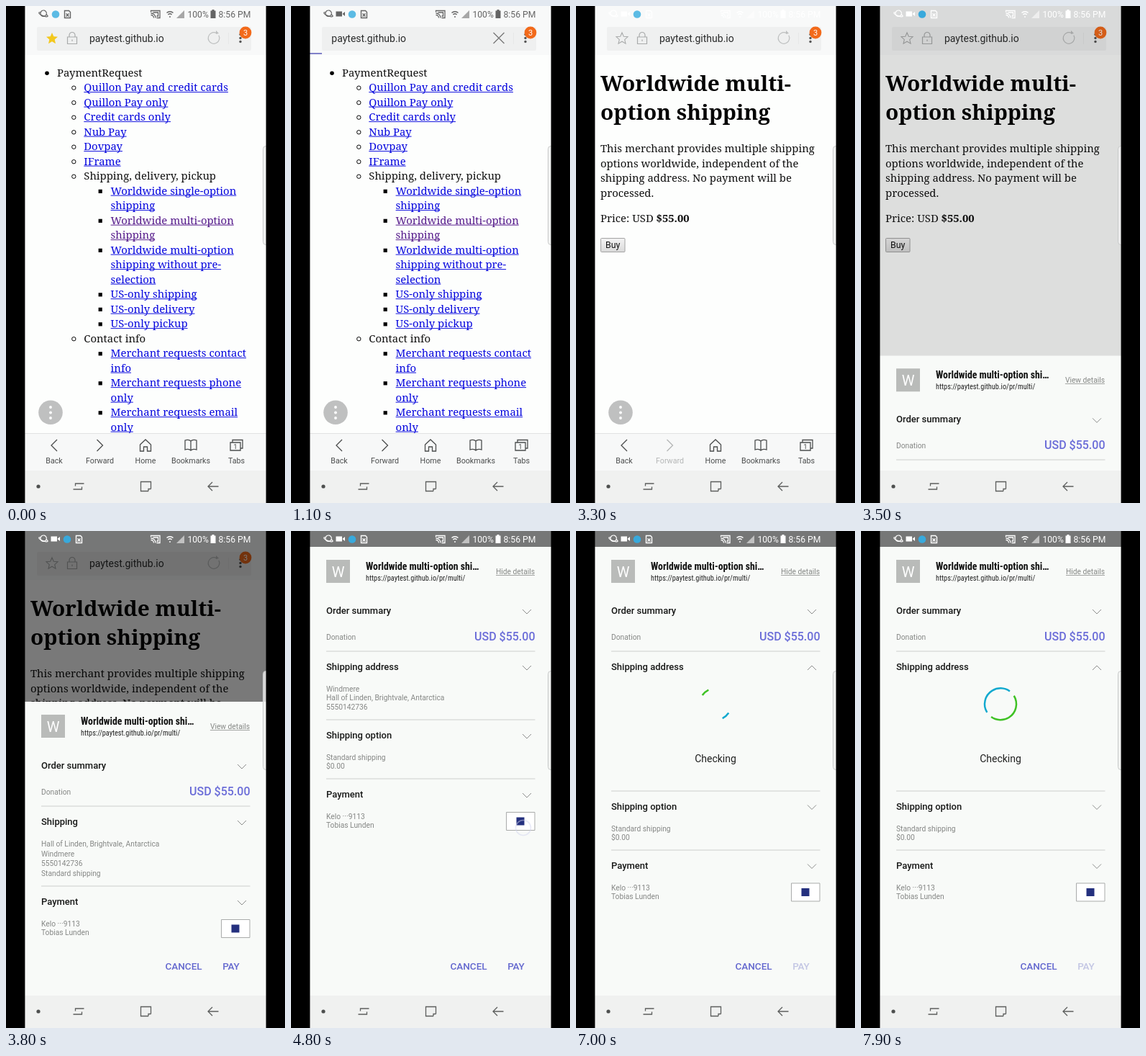
These frames come from a looping animation (388x690 px, 8000 ms). An HTML page with a canvas:

```html
<!DOCTYPE html>
<html lang="en">
<head>
<meta charset="utf-8">
<title>Payment request demo</title>
<style>
html, body { margin: 0; width: 100%; height: 100%; overflow: hidden; background: #000; }
canvas { display: block; width: 388px; height: 690px; }
</style>
</head>
<body>
<canvas id="stage"></canvas>
<script>
const W = 388, H = 690, LOOP = 8000, LEFT = 26, RIGHT = 362, BEZEL = 26.4;
const canvas = document.getElementById('stage');
const ctx = canvas.getContext('2d');
const ratio = window.devicePixelRatio || 1;
canvas.width = W * ratio;
canvas.height = H * ratio;

const sans = (size, weight = 400) => `${weight} ${size}px Roboto, sans-serif`;
const serif = (size, weight = 400) => `${weight} ${size}px "Noto Serif", serif`;
const SMALL = sans(10.25), BODY = serif(14.89);
const GREY = '#858785', INK = '#171817', ACCENT = '#6468cf';
const LINK = '#0606de', VISITED = '#551a8b';

const part = (t, a, b) => Math.min(1, Math.max(0, (t - a) / (b - a)));
const smooth = p => p * p * (3 - 2 * p);
const mix = (a, b, p) => a + (b - a) * p;

function box(x, y, w, h, color) {
  ctx.fillStyle = color;
  ctx.fillRect(x, y, w, h);
}

function round(x, y, w, h, r, fill, stroke) {
  ctx.beginPath();
  ctx.roundRect(x, y, w, h, r);
  if (fill) { ctx.fillStyle = fill; ctx.fill(); }
  if (stroke) { ctx.strokeStyle = stroke; ctx.lineWidth = 1; ctx.stroke(); }
}

function dot(x, y, r, color) {
  ctx.beginPath();
  ctx.arc(x, y, r, 0, 7);
  ctx.fillStyle = color;
  ctx.fill();
}

function arc(x, y, r, a, b, color, width = 1.2) {
  ctx.beginPath();
  ctx.arc(x, y, r, a, b);
  ctx.strokeStyle = color;
  ctx.lineWidth = width;
  ctx.stroke();
}

// Draws an SVG path around the point x, y.
function icon(d, x, y, color, width = 1.3, fill = false) {
  ctx.save();
  ctx.translate(x, y);
  const path = new Path2D(d);
  ctx.strokeStyle = ctx.fillStyle = color;
  ctx.lineWidth = width;
  if (fill) ctx.fill(path); else ctx.stroke(path);
  ctx.restore();
}

function put(str, x, y, font, color, align = 'left') {
  ctx.font = font;
  ctx.fillStyle = color;
  ctx.textAlign = align;
  ctx.fillText(str, x, y);
  return ctx.measureText(str).width;
}

function link(str, x, y, font, color) {
  const w = put(str, x, y, font, color);
  box(x, y + .95, w, .95, color);
}

// Narrow face where present, otherwise a smaller size of the normal one.
function narrow(str, x, y, max, size, weight, color) {
  const font = s => `${weight} ${s}px "Roboto Condensed", Roboto, sans-serif`;
  ctx.font = font(size);
  const w = ctx.measureText(str).width;
  put(str, x, y, font(w > max ? size * max / w : size), color);
}

function clip(x, y, w, h, paint) {
  ctx.save();
  ctx.beginPath();
  ctx.rect(x, y, w, h);
  ctx.clip();
  paint();
  ctx.restore();
}

function ring(t, x, y, from, to) {
  const a = part(t, from, from + 150) * (1 - part(t, to - 200, to));
  if (a <= 0) return;
  ctx.globalAlpha = a;
  arc(x, y, 10.5, 0, 7, '#d3d4ee', 1.6);
  ctx.globalAlpha = 1;
}

/* ---------- phone chrome ---------- */

function statusBar(color, circle, video) {
  icon('M-4 -1A4.2 4.2 0 1 1 4 1A4.2 4.2 0 0 1 -4 -1M-4 -2C-7 -3 -7 -1 -4 1C0 3.5 7 5 6 2.5L4 .5', 52, 11, color, 1.2);
  let x = 69;
  if (video) {
    icon('M-6 -3.5H2.5V3.5H-6ZM3 0L6.5 -3V3Z', 68.5, 11, color, 1, true);
    x = 85;
  }
  dot(x, 11.5, 5.3, circle);
  icon('M-4 -5H2L4 -3V5H-4ZM-2 -1L2 3M2 -1L-2 3', x + 16.5, 11.5, color, 1.4);
  icon('M-6 -3V-5H6.5V5H2M-6 1A4 4 0 0 1 -2 5M-6 -1.5A6.5 6.5 0 0 1 .5 5M-3 -2.5H4V2.5H2', 207.5, 11.5, color, 1.3);
  icon('M-4.5 -1.5A6.5 6.5 0 0 1 4.5 -1.5M-2.6 1A3.8 3.8 0 0 1 2.6 1M0 3V5', 228, 11, color, 1.4);
  ctx.globalAlpha = .55;
  icon('M-5 5.5L6 -5.5V5.5Z', 242, 11.5, color, 1, true);
  ctx.globalAlpha = 1;
  put('100%', 252.5, 16, sans(12.1), color);
  icon('M-3.5 -4.5H-1.5V-6H1.5V-4.5H3.5V6H-3.5Z', 288, 11, color, 1, true);
  put('8:56 PM', 295.5, 16, sans(12.2), color);
}

function urlBar(loading, starred) {
  round(43, 29, 298, 33, 2, '#eff0f0');
  if (loading) {
    put('paytest.github.io', 56.3, 50, sans(14), '#2a2b2b');
    icon('M-7.5 -7.5L7.5 7.5M7.5 -7.5L-7.5 7.5', 289, 44.5, '#777');
  } else {
    const star = 'M0 -8L2.3 -2.7L8 -2.2L3.7 1.6L5 7.2L0 4.2L-5 7.2L-3.7 1.6L-8 -2.2L-2.3 -2.7Z';
    icon(star, 64, 45, starred ? '#f3c81e' : '#a9abab', 1.1, starred);
    icon('M-6.5 -2H6.5V7.5H-6.5ZM-4 -2V-4.5A4 4 0 0 1 4 -4.5V-2M0 1.5V4', 92, 45, '#a9abab', 1.2);
    put('paytest.github.io', 116, 50, sans(14), '#2a2b2b');
    arc(289, 44.5, 7.8, -.5, 5.2, '#bcbebe');
    icon('M-1 -4L3 0L-1 1Z', 293, 38, '#bcbebe', 1, true);
  }
  box(309, 37, 1, 16, '#e6e7e7');
  for (const y of [39.5, 44.5, 49.5]) dot(326, y, 1.7, '#555');
  dot(333, 37, 8.4, '#f26a1b');
  put('3', 333, 41, sans(11), '#fff', 'center');
}

function toolbar(canForward) {
  box(LEFT, 593, RIGHT - LEFT, 52, '#f7f8f8');
  box(LEFT, 593, RIGHT - LEFT, 1, '#e1e2e2');
  const on = '#4b4d4d', off = '#b4b6b6';
  const items = [
    ['Back', 67, 'M4 -8L-4 0L4 8'],
    ['Forward', 130.5, 'M-4 -8L4 0L-4 8'],
    ['Home', 194, 'M-7.5 -1L0 -8L7.5 -1V8H2.5V2H-2.5V8H-7.5Z'],
    ['Bookmarks', 257, 'M0 -6C-2 -8 -6 -8 -8 -7V6C-6 5 -2 5 0 7C2 5 6 5 8 6V-7C6 -8 2 -8 0 -6V7'],
    ['Tabs', 320.5, 'M-8.5 -4H5.5V7H-8.5ZM-5.5 -4V-7.5H8.5V4H5.5']
  ];
  for (const [name, x, d] of items) {
    const color = name === 'Forward' && !canForward ? off : on;
    icon(d, x, 610, color);
    put(name, x, 635, sans(10.7), color, 'center');
  }
  put('1', 319, 615, sans(9.5), on, 'center');
}

function navBar() {
  box(LEFT, 645, RIGHT - LEFT, 45, '#f0f1f0');
  dot(45, 667, 2.6, '#4d4f4e');
  icon('M-4.5 -.5V-4H7.5M-7.5 4H4.5V.5', 101, 667, '#5d5f5e');
  icon('M3.5 6.5H-7V-6.5H7V3.5M7 3.5H3.5V6.5', 194.5, 667, '#5d5f5e');
  icon('M7.5 0H-6.5M-1 -6L-7 0L-1 6', 288, 667, '#5d5f5e');
}

function edgeHandle() {
  clip(350, 180, RIGHT - 350, 165, () => round(357.5, 194.5, 12, 137, 4, 'rgba(240,241,241,.8)', '#c9cbcb'));
}

function floatButton() {
  dot(62, 564.3, 16.8, '#bfc0c0');
  for (const y of [557, 564.5, 572]) dot(62, y, 1.9, '#fff');
}

/* ---------- web pages ---------- */

const rows = [
  [0, 'PaymentRequest'],
  [1, 'Quillon Pay and credit cards', LINK], [1, 'Quillon Pay only', LINK],
  [1, 'Credit cards only', LINK], [1, 'Nub Pay', LINK], [1, 'Dovpay', LINK],
  [1, 'IFrame', LINK], [1, 'Shipping, delivery, pickup'],
  [2, 'Worldwide single-option|shipping', LINK],
  [2, 'Worldwide multi-option|shipping', VISITED],
  [2, 'Worldwide multi-option|shipping without pre-|selection', LINK],
  [2, 'US-only shipping', LINK], [2, 'US-only delivery', LINK], [2, 'US-only pickup', LINK],
  [1, 'Contact info'],
  [2, 'Merchant requests contact|info', LINK],
  [2, 'Merchant requests phone|only', LINK],
  [2, 'Merchant requests email|only', LINK]
];

function listPage() {
  let y = 97.7;
  for (const [level, label, color] of rows) {
    const x = 71 + level * 37.3, mark = x - 14, my = y - 4.5;
    if (level === 0) dot(mark, my, 2.8, '#000');
    if (level === 1) arc(mark, my, 2.7, 0, 7, '#000', 1);
    if (level === 2) box(mark - 3, my - 2.5, 5.2, 5.2, '#000');
    for (const line of label.split('|')) {
      if (color) link(line, x, y, BODY, color);
      else put(line, x, y, BODY, '#111');
      y += 20.5;
    }
  }
}

function shopPage(pressed) {
  put('Worldwide multi-', 34, 117.5, serif(29.78, 700), '#050505');
  put('option shipping', 34, 158, serif(29.78, 700), '#050505');
  ['This merchant provides multiple shipping', 'options worldwide, independent of the',
    'shipping address. No payment will be', 'processed.'
  ].forEach((line, i) => put(line, 34, 203.3 + i * 20.5, BODY, '#111'));
  const w = put('Price: USD ', 34, 300, BODY, '#111');
  put('$55.00', 34 + w, 300, serif(14.89, 700), '#111');
  const shade = ctx.createLinearGradient(0, 322, 0, 342);
  shade.addColorStop(0, pressed ? '#d2d2d2' : '#f4f4f4');
  shade.addColorStop(1, pressed ? '#e6e6e6' : '#d9d9d9');
  round(34.5, 322.5, 33.5, 19, 1, shade, '#a3a3a3');
  put('Buy', 51.2, 336, sans(12.3), '#111', 'center');
}

function browser(t) {
  const shop = t >= 1400;
  box(LEFT, 0, RIGHT - LEFT, H, '#fdfefd');
  clip(LEFT, 68, RIGHT - LEFT, 525, () => {
    if (!shop) listPage();
    else if (t >= 1480) shopPage(t > 2880 && t < 3150);
  });
  box(LEFT, 0, RIGHT - LEFT, 68, '#f8f9f9');
  urlBar(t >= 880 && !shop, !shop);
  if (t >= 980 && t < 1500) {
    const w = t < 1250 ? 17 * part(t, 980, 1080) : mix(17, 336, part(t, 1250, 1480));
    box(LEFT, 65, w, 2, '#8181c9');
  }
  toolbar(t < 1480);
  floatButton();
  ring(t, 231, 308, 380, 850);
  ring(t, 51, 332, 2780, 3250);
}

/* ---------- payment sheet ---------- */

function chevron(y, up) {
  icon(up ? 'M-6 3L0 -3L6 3' : 'M-6 -3L0 3L6 -3', 328, y, '#8b8d8b', 1);
}

function section(title, d, lines = [], pitch = 12.4, open = false) {
  box(49, Math.round(d) - .5, 290.5, 1, '#cdcfcd');
  put(title, 49, d + 26, sans(13, 500), INK);
  chevron(d + 23, open);
  lines.forEach((line, i) => put(line, 49, d + 56 + i * pitch, SMALL, GREY));
}

function payment(d) {
  section('Payment', d, ['Kelo ···9113', 'Tobias Lunden']);
  round(299.5, d + 46.5, 39.5, 25, 0, '#fff', '#a9abaa');
  box(313.5, d + 53.5, 11, 11, '#24307e');
}

function sheetTop(y, action) {
  box(49, y + 17, 33, 32, '#b9bbb9');
  put('W', 65.5, y + 40.5, sans(20), '#fff', 'center');
  narrow('Worldwide multi-option shi…', 104, y + 31, 157.5, 14, 700, '#111');
  narrow('https://paytest.github.io/pr/multi/', 104, y + 46, 138.5, 10.5, 400, '#222');
  const w = put(action, 339, y + 37, SMALL, GREY, 'right');
  box(339 - w, Math.round(y + 38), w, 1, '#a3a5a3');
  put('Order summary', 49, y + 92, sans(13, 500), INK);
  chevron(y + 89, false);
  put('Donation', 49, y + 128, SMALL, GREY);
  put('USD $55.00', 339.5, y + 128.5, sans(16, 500), '#6a6cd8', 'right');
}

function sheetEnd(y, ready) {
  put('CANCEL', 247, y, sans(13.5, 500), ACCENT, 'center');
  put('PAY', 313, y, sans(13.5, 500), ready ? ACCENT : '#c3c6e4', 'center');
}

const PLACE = 'Hall of Linden, Brightvale, Antarctica';
const NAME = 'Windmere', PHONE = '5550142736';

function shortSheet(t) {
  const p = part(t, 3420, 3790), y = mix(645, 238, 1 - (1 - p) ** 2);
  clip(LEFT, y - 1, RIGHT - LEFT, 646 - y, () => {
    box(LEFT, y - 1, RIGHT - LEFT, 646 - y, '#f8faf8');
    sheetTop(y, 'View details');
    section('Shipping', y + 144, [PLACE, NAME, PHONE, 'Standard shipping'], 13.7);
    payment(y + 255);
    sheetEnd(y + 371, true);
  });
  ring(t, 323, 412, 4380, 4900);
}

function addressList() {
  arc(55, 232, 5, 0, 7, ACCENT);
  dot(55, 232, 2.5, ACCENT);
  [NAME, PLACE, PHONE].forEach((line, i) => put(line, 76, 223 + i * 12.4, SMALL, GREY));
  arc(55, 272, 5, 0, 7, GREY);
  ['Marlow Dane', 'Pine Terrace, Coldbrook, Antarctica']
    .forEach((line, i) => put(line, 76, 269 + i * 12.4, SMALL, GREY));
  put('+ Add address', 49, 303, SMALL, ACCENT);
}

function spinner(t) {
  const s = t - 6300, deg = Math.PI / 180;
  const mid = (270 + s * 317 / 1600) * deg;
  const half = (90 - 75 * Math.sin(Math.PI * s / 1422) ** 2) * deg;
  arc(194, 240.3, 22, mid - half, mid + half, '#12a9cf', 2.5);
  arc(194, 240.3, 22, mid + Math.PI - half, mid + Math.PI + half, '#3fc225', 2.5);
}

function fullSheet(t) {
  const open = t >= 4850, checking = t >= 6170;
  const d = checking ? mix(322, 360.5, smooth(part(t, 6170, 6550)))
    : mix(262, 322, smooth(part(t, 4850, 5190)));
  box(LEFT, 22, RIGHT - LEFT, 623, '#f8faf8');
  sheetTop(23, 'Hide details');
  section('Shipping address', 167, open ? [] : [NAME, PLACE, PHONE], 12.4, open);
  if (open) clip(LEFT, 205, RIGHT - LEFT, d - 217, () => {
    if (!checking) addressList();
    else {
      spinner(t);
      put('Checking', 194, 320.5, sans(14), '#202120', 'center');
    }
  });
  section('Shipping option', d, ['Standard shipping', '$0.00']);
  payment(d + 82);
  sheetEnd(609, !checking);
  ring(t, 323, 412, 4380, 4900);
  ring(t, 121, 264, 5980, 6600);
}

/* ---------- timeline ---------- */

function draw(t) {
  ctx.setTransform(ratio, 0, 0, ratio, 0, 0);
  box(0, 0, W, H, '#000');
  clip(LEFT, 0, RIGHT - LEFT, H, () => {
    browser(t);
    const dim = .52 * part(t, 3420, 3760);
    box(LEFT, 0, RIGHT - LEFT, 645, `rgba(0,0,0,${dim})`);
    if (t >= 4790) fullSheet(t);
    else if (t >= 3420) shortSheet(t);
    const pale = Math.round(mix(100, 255, part(t, 3150, 3280)));
    statusBar(`rgb(${pale},${pale},${pale})`, t < 3420 ? '#5cbbe4' : '#38a9dc', t >= 100);
    navBar();
    edgeHandle();
  });
  box(0, 0, BEZEL, H, '#000');
  box(W - BEZEL, 0, BEZEL, H, '#000');
}

function loop() {
  draw(performance.now() % LOOP);
  requestAnimationFrame(loop);
}
loop();
</script>
</body>
</html>
```
